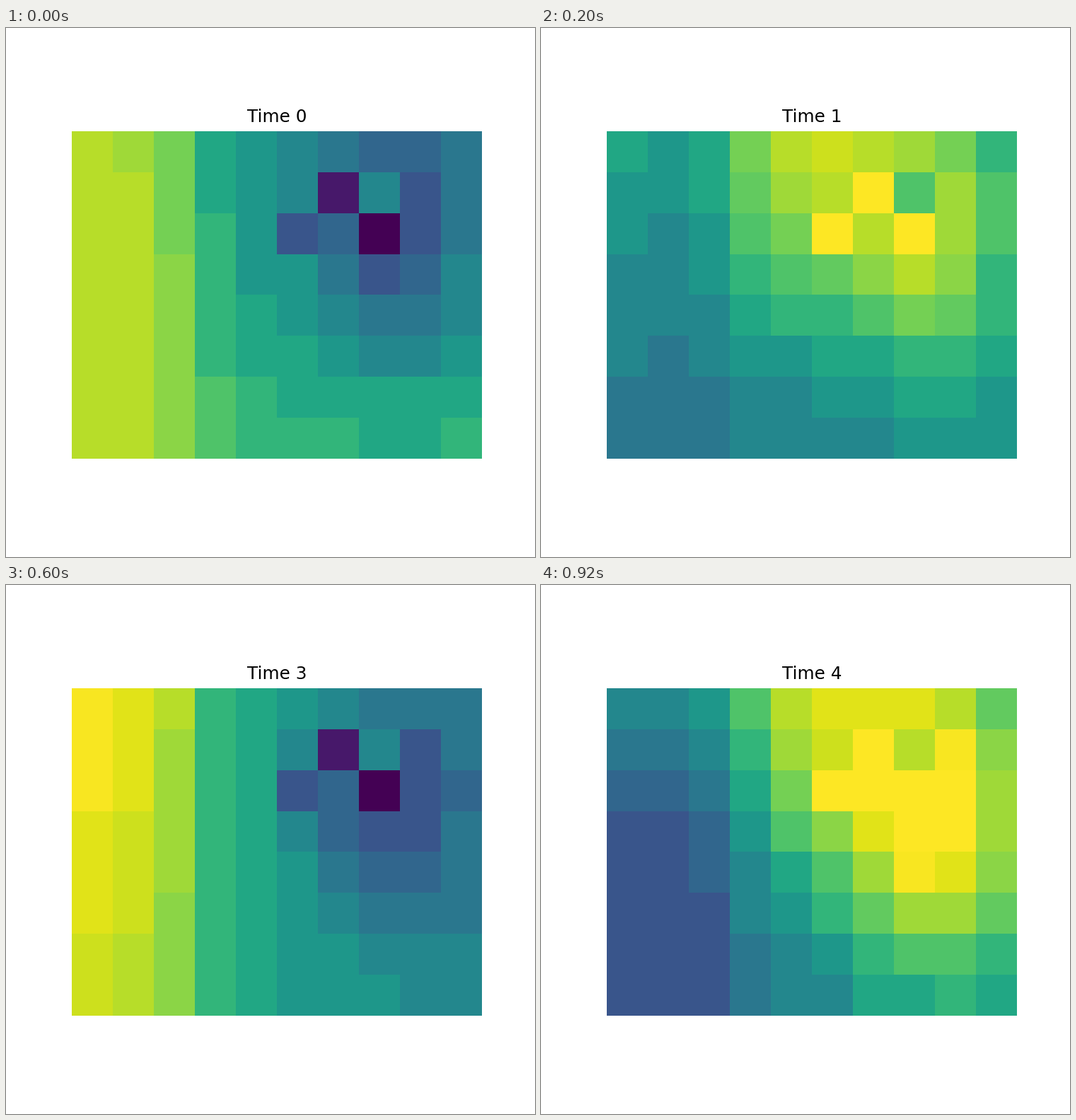
Write a matplotlib script that moves like this. It is 748 px wide and 748 px high and loops after 1 s.

```python
import numpy as np
import matplotlib.pyplot as plt
from matplotlib.animation import FuncAnimation

SIZE = 748
ROWS, COLS = 8, 10
LEFT, TOP, RIGHT, BOTTOM = 93, 146, 673, 609

y, x = np.mgrid[:ROWS, :COLS].astype(float)
swell = np.sin(np.pi * y / (ROWS - 1))  # strongest in the middle rows


def bell(value, centre, width):
    return np.exp(-((value - centre) / width) ** 2)


def start_field():
    """Warm left edge, a cold basin at the upper right, a few odd cells."""
    warm = 1 / (1 + np.exp(2 * (x - 2.6)))
    field = 89 * warm + (48 + 2.3 * y) * (1 - warm)
    field -= 30 * bell(x, 7.3, 1.8) * bell(y, 2.3, 2.8)
    for row, col, offset in [(1, 6, -29), (2, 7, -24), (1, 7, 19), (2, 5, -21)]:
        field[row, col] += offset
    return field


def snap(field):
    """Round to the measuring steps, finer in the upper range."""
    step = np.where(field < 75, 6.6, 3.3)
    return np.clip(np.round(field / step) * step, 0, 100)


# The field swings to its opposite, drifts diagonally, then swings again.
start = start_field()
balance = (145 - 4 * x + y * (0.38 * x - 2.6)
           + 12 * bell(x, 4.5, 2) * np.cos(np.pi * y / (ROWS - 1)))
opposite = balance - start
drift = 38 + 2.6 * x + 3.2 * y + 2.5 * swell * (x - 3)
returned = start + 11 - 1.1 * x - y * (1.1 + 0.17 * x)
stronger = opposite - (11 + 10 * swell) * np.cos(np.pi * (x - 0.5) / 7.5)

fields = [snap(f) for f in (start, opposite, drift, returned, stronger)]

fig = plt.figure(figsize=(5, 5), dpi=SIZE / 5)
ax = fig.add_axes([LEFT / SIZE, 1 - BOTTOM / SIZE,
                   (RIGHT - LEFT) / SIZE, (BOTTOM - TOP) / SIZE])
ax.axis("off")
image = ax.imshow(fields[0], cmap="viridis", vmin=0, vmax=100,
                  interpolation="nearest", aspect="auto")
title = ax.set_title("Time 0", fontname="DejaVu Sans", fontsize=11.9, pad=6.1)


def update(time):
    image.set_data(fields[time])
    title.set_text(f"Time {time}")
    return image, title


anim = FuncAnimation(fig, update, frames=len(fields), interval=200, repeat=True)
plt.show()
```
